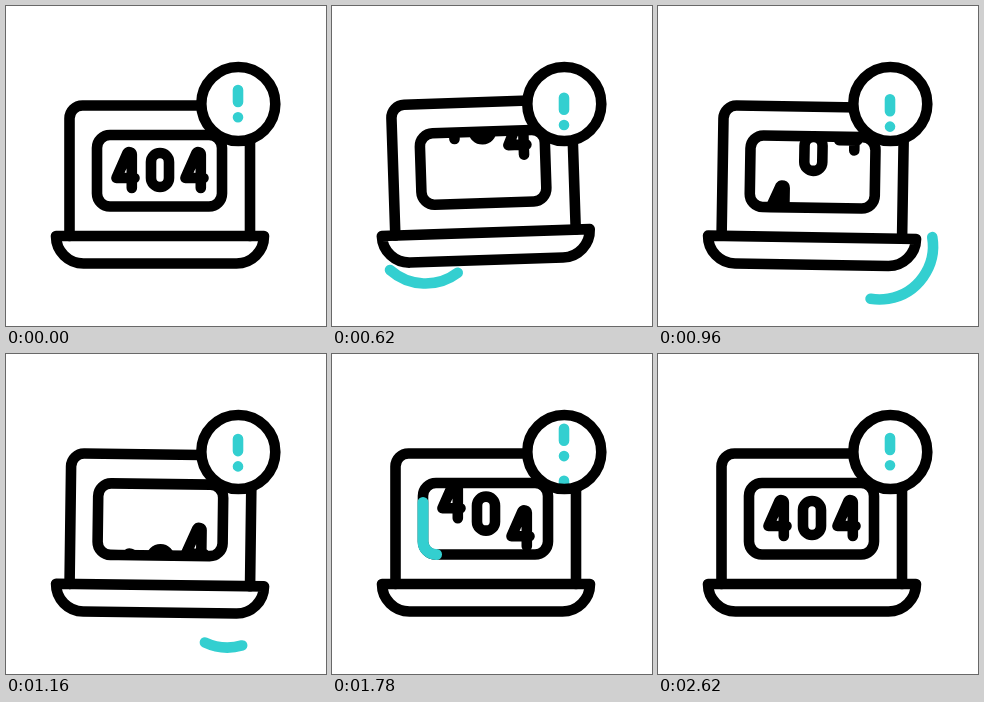
Write an HTML page with a canvas that moves like this. It is 320 px wide and 320 px high and loops after 2760 ms.

```html
<!DOCTYPE html>
<html lang="en">
<head>
<meta charset="utf-8">
<title>404</title>
<style>
html, body { margin: 0; width: 100%; height: 100%; overflow: hidden; background: #fff; }
canvas { display: block; width: 100vw; height: 100vh; }
</style>
</head>
<body>
<canvas id="stage" width="320" height="320"></canvas>
<script>
const ctx = document.getElementById('stage').getContext('2d');
const LOOP = 2760, TEAL = '#33cfd0', RAD = Math.PI / 180;

// Sine ease between [time, value] keys
function tween(t, keys) {
  if (t <= keys[0][0]) return keys[0][1];
  for (let i = 1; i < keys.length; i++) {
    const [t0, a] = keys[i - 1], [t1, b] = keys[i];
    if (t < t1) return a + (b - a) * (1 - Math.cos(Math.PI * (t - t0) / (t1 - t0))) / 2;
  }
  return keys[keys.length - 1][1];
}

function stroke(path, color = '#000', width = 10.6) {
  ctx.strokeStyle = color;
  ctx.lineWidth = width;
  ctx.stroke(path);
}

function layer(draw) {
  ctx.save();
  draw();
  ctx.restore();
}

const lid = new Path2D('M63.5 230V112.5A13 13 0 0 1 76.5 99.5H231A13 13 0 0 1 244 112.5V230');
const base = new Path2D('M50 230H258A27.5 27.5 0 0 1 230.5 257.5H77.5A27.5 27.5 0 0 1 50 230Z');
// Begins on the bottom edge so the highlight can run clockwise from there
const panel = new Path2D('M112 200.5H104A13 13 0 0 1 91 187.5V142A13 13 0 0 1 104 129H203A13 13 0 0 1 216 142V187.5A13 13 0 0 1 203 200.5Z');
const panelLength = 2 * (99 + 45.5) + 26 * Math.PI;
const ring = new Path2D();
ring.arc(232.3, 98, 37, 0, 7);
const four = new Path2D('M125.8 182V148.5a2.4 2.4 0 0 0 -4.4 -1.3L110.5 172H128.5');
const zero = new Path2D('M145 156a9 9 0 0 1 18 0v16a9 9 0 0 1 -18 0Z');
const mark = new Path2D('M232 84V96M232 111.3h.01');
const digits = [[four, 0, 0], [zero, 0, 140], [four, 69, 220]];

const digitKeys = [[200, 0], [230, 3], [520, -46.5], [670, -46.5], [1085, 53], [1250, 53], [1800, -18], [2400, 0]];
const tiltKeys = [[200, 0], [560, -1.9], [660, -1.9], [1060, 1.4], [1270, 0]];
const liftKeys = [[200, 0], [440, -3], [720, 0]];
const markKeys = [[340, 0], [720, 71], [1180, 53], [1440, 53], [2620, 0]];

const trim = (t, start, lag, span) =>
  [start + lag, start].map(s => tween(t, [[s, 0], [s + span, 1]]));

function sweep(t, start, x, y, from, turn) {
  const [tail, head] = trim(t, start, 260, 380);
  if (head <= 0 || tail >= 1) return;
  const path = new Path2D();
  path.arc(x, y, 53.5, (from + turn * tail) * RAD, (from + turn * head) * RAD, turn < 0);
  stroke(path, TEAL);
}

function highlight(t) {
  const [tail, head] = trim(t, 1540, 163, 860);
  if (head <= 0 || tail >= 1) return;
  layer(() => {
    ctx.setLineDash([(head - tail) * panelLength, 2 * panelLength]);
    ctx.lineDashOffset = -tail * panelLength;
    stroke(panel, TEAL, 11);
  });
}

function laptop(t) {
  ctx.translate(75, 235 + tween(t, liftKeys));
  ctx.rotate(tween(t, tiltKeys) * RAD);
  ctx.translate(-75, -235);
  stroke(lid);
  stroke(base);
  layer(() => {
    ctx.clip(panel);
    for (const [shape, x, lag] of digits) layer(() => {
      ctx.translate(x, tween(t - lag, digitKeys));
      stroke(shape);
    });
  });
  stroke(panel);
  highlight(t);
}

function badge(t) {
  ctx.fillStyle = '#fff';
  ctx.fill(ring);
  layer(() => {
    ctx.clip(ring);
    ctx.translate(0, tween(t, markKeys));
    stroke(mark, TEAL);
    ctx.translate(0, -52);
    stroke(mark, TEAL);
  });
  stroke(ring);
}

function frame(now) {
  const t = now % LOOP;
  ctx.fillStyle = '#fff';
  ctx.fillRect(0, 0, 320, 320);
  ctx.lineCap = ctx.lineJoin = 'round';
  sweep(t, 200, 93.5, 224, 180, -127);
  sweep(t, 667, 221.5, 240, -12, 127);
  layer(() => laptop(t));
  badge(t);
  requestAnimationFrame(frame);
}
requestAnimationFrame(frame);
</script>
</body>
</html>
```
